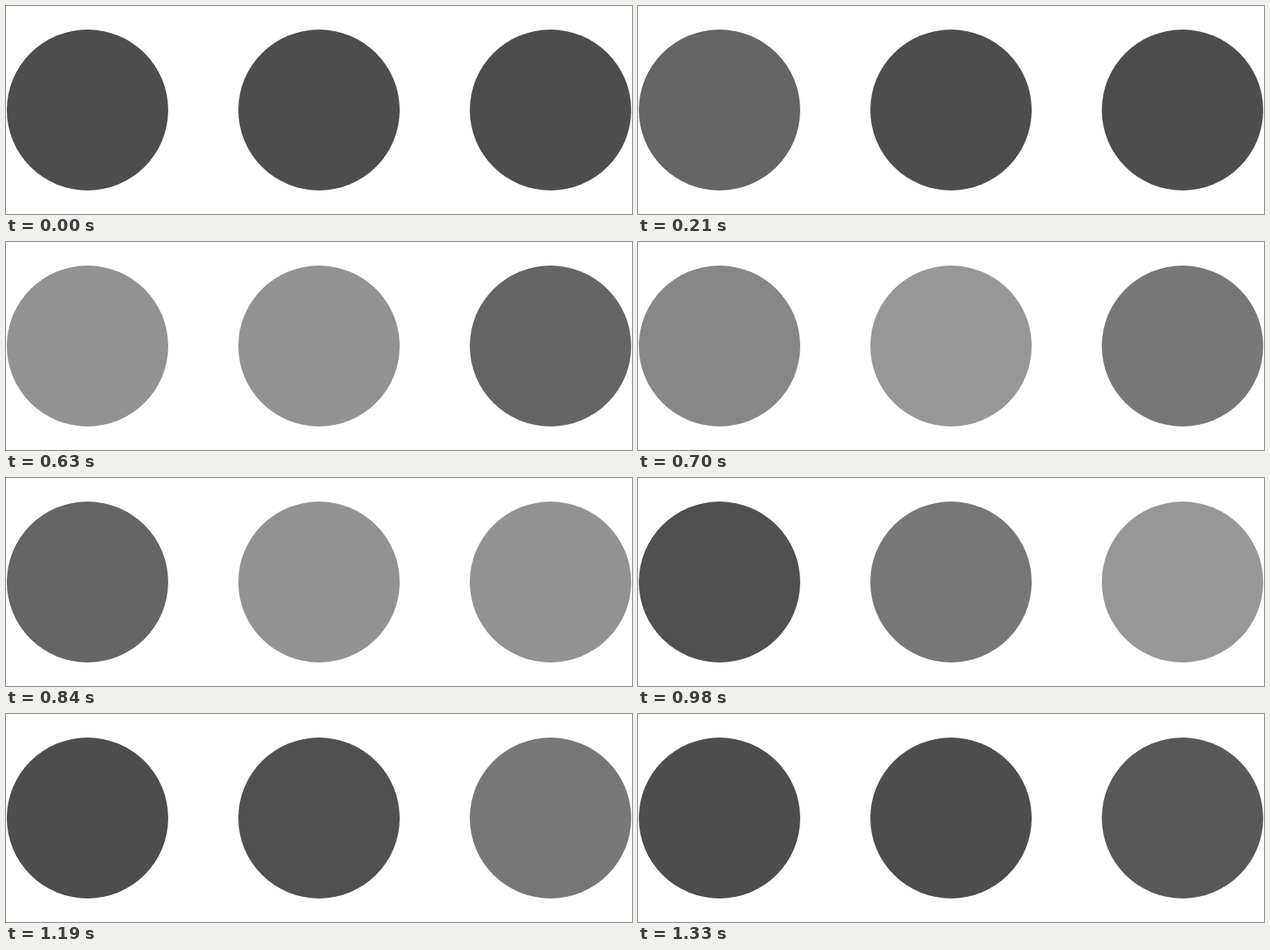
An HTML page that plays this animation: 768 by 256 pixels, repeating every 1.54 s.

```html
<!DOCTYPE html>
<html lang="en">
<head>
<meta charset="utf-8">
<title>Loading dots</title>
<style>
  html, body { margin: 0; width: 100%; height: 100%; overflow: hidden; background: #fff; }
  svg { display: block; width: 100%; height: 100%; }
</style>
</head>
<body>
<svg viewBox="0 0 768 256" fill="#4d4d4d">
  <circle cx="100" cy="128" r="99"/>
  <circle cx="384" cy="128" r="99"/>
  <circle cx="668" cy="128" r="99"/>
</svg>
<script>
const LOOP = 1540, STEP = 70;
const DELAY = 3, PULSE = 15; // in steps
const DARK = 77, RANGE = 75;
const dots = document.querySelectorAll('circle');

const clamp = (x, lo, hi) => Math.min(hi, Math.max(lo, x));
const ease = t => t < 0.5 ? 2 * t * t : 1 - 2 * (1 - t) ** 2;

function draw() {
  let step = Math.floor(performance.now() % LOOP / STEP);
  // The picture holds at both ends of the loop.
  step = step < 3 ? 0 : Math.min(step, 19);
  dots.forEach((dot, i) => {
    const phase = clamp(step - i * DELAY, 0, PULSE) / PULSE;
    const grey = Math.round(DARK + RANGE * ease(1 - Math.abs(2 * phase - 1)));
    dot.setAttribute('fill', `rgb(${grey},${grey},${grey})`);
  });
  requestAnimationFrame(draw);
}
draw();
</script>
</body>
</html>
```
